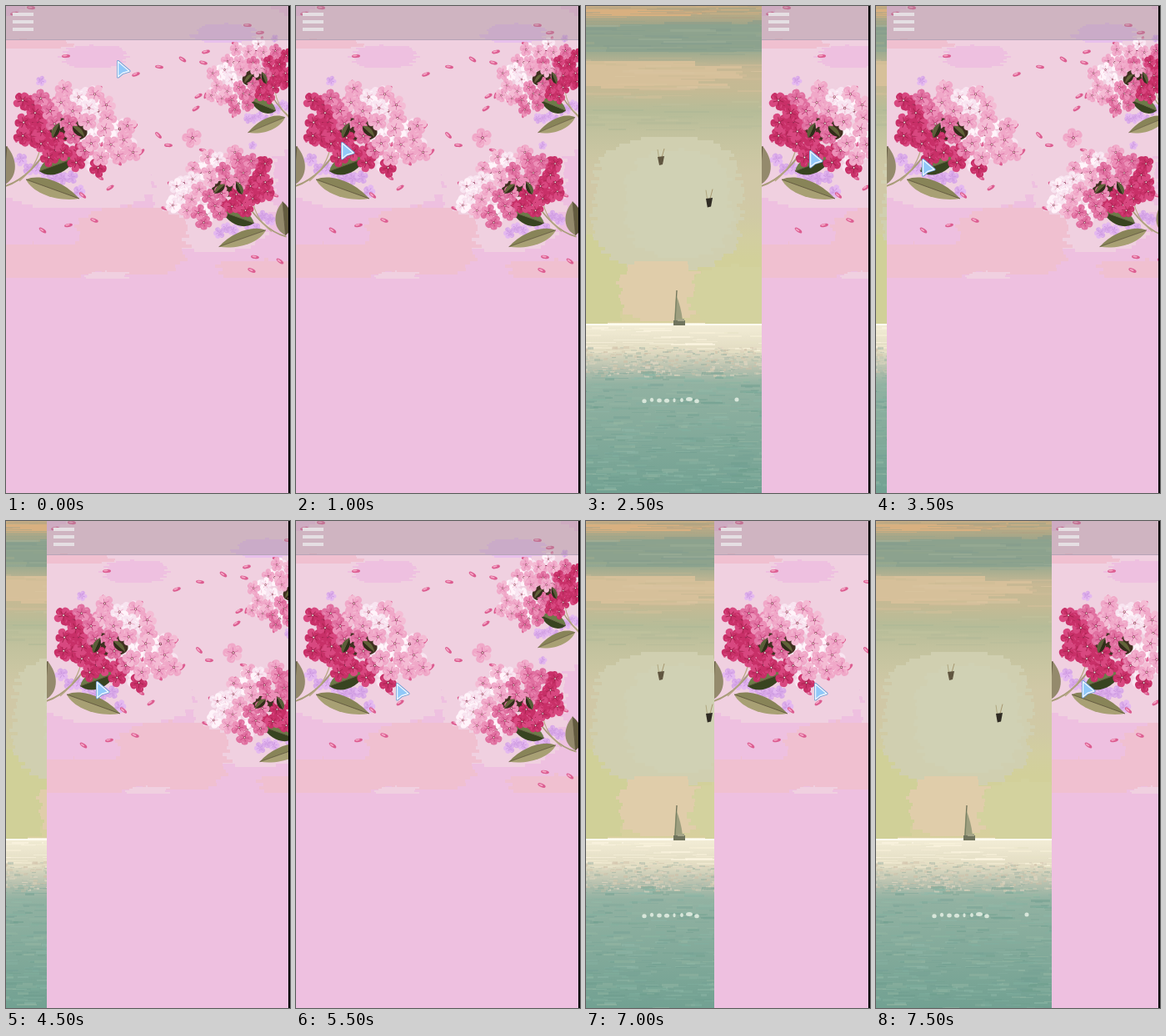
These frames come from a looping animation (341x584 px, 8 s). An HTML page with a canvas:

```html
<!DOCTYPE html>
<html lang="en">
<head>
<meta charset="utf-8">
<title>Sliding drawer</title>
<style>
  html, body { margin: 0; width: 100%; height: 100%; overflow: hidden; background: #000; }
  #stage { position: relative; width: 339px; height: 584px; overflow: hidden; }
  canvas, #panel, #cursor { position: absolute; left: 0; top: 0; }
  #panel { width: 339px; height: 584px; animation: slide 8s step-end infinite; }
  #bar { position: absolute; inset: 0 0 auto; height: 40px; background: rgba(160,140,150,.42); border-bottom: 1px solid #b6a4b8; }
  #bar i { position: absolute; left: 8px; top: 8px; width: 25px; height: 4px; color: #e5dfe3; background: currentColor; box-shadow: 0 9px, 0 18px; }
  #cursor { animation: grab 8s step-end infinite; }
  @keyframes slide {
    0%, 12.5%, 50%, 68.75% { transform: none; }
    18.75% { transform: translateX(168px); }
    25% { transform: translateX(194px); }
    31.25%, 93.75%, 100% { transform: translateX(211px); }
    37.5% { transform: translateX(143px); }
    43.75% { transform: translateX(13px); }
    56.25% { transform: translateX(49px); }
    62.5% { transform: translateX(25px); }
    75% { transform: translateX(102px); }
    81.25% { transform: translateX(118px); }
    87.5% { transform: translateX(154px); }
  }
  /* The pointer rides on the panel; this is where it holds it. */
  @keyframes grab {
    0% { transform: translate(133px, 65px); }
    6.25% { transform: translate(17px, 132px); }
    12.5% { transform: translate(54px, 163px); }
    31.25% { transform: translate(57px, 173px); }
    37.5% { transform: translate(42px, 183px); }
    50% { transform: translate(59px, 192px); }
    68.75% { transform: translate(120px, 194px); }
    93.75%, 100% { transform: translate(36px, 191px); }
  }
</style>
</head>
<body>
<div id="stage">
  <canvas id="sea" width="339" height="584"></canvas>
  <div id="panel">
    <canvas id="garden" width="339" height="584"></canvas>
    <div id="bar"><i></i></div>
    <svg id="cursor" width="20" height="26" stroke-linejoin="round">
      <path id="arrow" d="M1.500 1.500V20L7 15.500L15 13Z" fill="none" stroke="#6898d0" stroke-width="3"/>
      <path d="M1.500 1.500V20L7 15.500L15 13Z" fill="#90c8f8" stroke="#eef6ff" stroke-width="1.500"/>
    </svg>
  </div>
</div>
<script>
let g, seed = 11;
const rnd = (a = 1, b = 0) => {
  seed = (seed * 16807) % 2147483647;
  return b + (a - b) * seed / 2147483647;
};
const pick = list => list[Math.floor(rnd(list.length))];
const times = (n, f) => { for (let i = 0; i < n; i++) f(i); };

function open(id) {
  g = document.getElementById(id).getContext('2d');
}

function box(color, x, y, w, h) {
  g.fillStyle = color;
  g.fillRect(Math.round(x), Math.round(y), Math.ceil(w), Math.ceil(h));
}

function oval(x, y, rx, ry, color, turn = 0) {
  g.beginPath();
  g.ellipse(x, y, rx, ry, turn, 0, 7);
  g.fillStyle = color;
  g.fill();
}

function line(color, width, x, y, ...curve) {
  g.beginPath();
  g.moveTo(x, y);
  if (curve.length > 2) g.quadraticCurveTo(...curve); else g.lineTo(...curve);
  g.strokeStyle = color;
  g.lineWidth = width;
  g.stroke();
}

function shape(color, path) {
  g.fillStyle = color;
  g.fill(new Path2D(path));
}

// Rounded wash of colour with ragged stepped sides.
function patch(color, x, y, rx, ry, step = 4, rag = 6) {
  for (let dy = -ry; dy < ry; dy += step) {
    const half = rx * Math.sqrt(1 - (dy / ry) ** 4);
    const left = half + rnd(rag, -rag), right = half + rnd(rag, -rag);
    box(color, x - left, y + dy, Math.max(0, left + right), step);
  }
}

function streaks(n, y0, y1, w, h, colors, alpha) {
  times(n, () => {
    g.globalAlpha = alpha * rnd(1, .4);
    box(pick(colors), rnd(339, -w), rnd(y1, y0), rnd(w, w / 4), rnd(h));
  });
  g.globalAlpha = 1;
}

function bird(x, y, s, color) {
  line('#b0a880', 1, x - 4, y - 13 * s, x - 2, y);
  line('#a89870', 1, x + 4, y - 14 * s, x, y);
  shape(color, `M${x - 4} ${y - 4}L${x + 4} ${y - 5}L${x + 2} ${y + 5 * s}L${x - 2 * s} ${y + 6 * s}Z`);
}

function drawSea() {
  open('sea');
  const air = g.createLinearGradient(0, 0, 0, 380);
  ['#c8ae84', '#9aa48a', '#95a88e', '#c8b894', '#c4ba94', '#b6bc98', '#c2c29e', '#cac6a2',
   '#d0c8a6', '#d0c8a6', '#d0caa4', '#d2cea0', '#d2d09a', '#d2d09a', '#d4d09c', '#d8d09e'
  ].forEach((c, i, all) => air.addColorStop(i / (all.length - 1), c));
  box(air, 0, 0, 339, 380);
  const water = g.createLinearGradient(0, 380, 0, 584);
  water.addColorStop(0, '#f4eed8');
  water.addColorStop(.16, '#e2dcc2');
  water.addColorStop(.27, '#b6c0ae');
  water.addColorStop(.36, '#92b2a2');
  water.addColorStop(1, '#72a192');
  box(water, 0, 380, 339, 204);

  // Clouds
  patch('#d8b080', 60, 7, 80, 5, 2, 20);
  patch('#8ca28e', 120, 37, 150, 18, 3, 40);
  patch('#d6c09a', 60, 80, 110, 17, 3, 30);
  streaks(50, 0, 14, 80, 2, ['#d8b080', '#b0a080', '#a0a488'], .6);
  streaks(70, 15, 60, 90, 3, ['#809a8c', '#a0b098', '#90a48c'], .5);
  streaks(60, 61, 108, 80, 3, ['#d8c09c', '#c4b890', '#d8c4a0'], .5);
  streaks(45, 106, 150, 70, 3, ['#b0b898', '#c4c4a0', '#a8b494'], .4);

  // Glow behind the birds
  patch('#d0d098', 15, 325, 38, 55);
  patch('#d0cfb0', 98, 235, 88, 82);
  patch('#d0d1b4', 112, 235, 62, 65);
  patch('#e0cdaa', 88, 340, 46, 38);
  patch('#d3d29e', 180, 345, 54, 36);

  // Water
  box('#fffdf0', 0, 381, 339, 2);
  streaks(90, 384, 414, 40, 2, ['#f8f0d8', '#e8e4c8', '#fff8e4'], .7);
  streaks(700, 408, 443, 7, 3, ['#d8d0b8', '#b0bcac', '#e4d8c4', '#a0b4a4', '#d0c0a8'], .65);
  streaks(800, 436, 584, 26, 3, ['#90b8a8', '#74a094', '#80b0a0', '#98b8a4', '#6c9c8c'], .5);
  times(9, i => oval(i < 8 ? 70 + i * 9 : 181, 473 + rnd(2, -2), rnd(4, 1.500), 2.500, '#d8e6da'));

  bird(90, 185, 1, '#605640');
  bird(148, 235, 1.1, '#302c24');

  // Boat
  line('#606850', 1.2, 109, 341, 107, 378);
  shape('rgba(130,140,108,.7)', 'M108 346Q114 360 116 377H106Z');
  box('#70745e', 105, 377, 14, 6);
  box('#a4a488', 110, 375, 8, 3);
}

const tones = {
  deep: ['#c83068', '#d84880', '#a82450'],
  rose: ['#e070a0', '#ec90b8', '#c84880'],
  pale: ['#f0a8c8', '#f4bcd4', '#e080b0'],
  white: ['#f8e4f0', '#fff4fa', '#f0b8d0'],
  lilac: ['#d8a8e8', '#e4b8f0', '#cc98e0']
};

function flower(x, y, r, tone) {
  const [base, light, vein] = tones[tone];
  g.save();
  g.translate(x, y);
  g.rotate(rnd(6));
  times(5, () => {
    g.rotate(Math.PI * .4);
    const s = r * rnd(1.1, .9), w = r * .55;
    shape(pick([base, base, light]), `M0 0C${s * .4} ${-w} ${s} ${-w} ${s} 0C${s} ${w} ${s * .4} ${w} 0 0`);
    line(vein, 1, s * .1, 0, s * .55, s * .1);
    line(light, 1.200, s * .5, -w * .5, s * .8, -w * .2);
  });
  if (tone != 'lilac') {
    oval(0, 0, r * .14, r * .14, '#80284c');
    oval(0, 0, .9, .9, '#fff4e4');
  }
  g.restore();
}

function leaf(x, y, x2, y2, w, dark, light) {
  const d = Math.hypot(x2 - x, y2 - y);
  g.save();
  g.translate(x, y);
  g.rotate(Math.atan2(y2 - y, x2 - x));
  for (const [s, color] of [[w, dark], [-w, light]])
    shape(color, `M0 0C${d * .2} ${s} ${d * .65} ${s} ${d} 0`);
  line('#5c5438', .8, 0, 0, d, 0);
  g.restore();
}

function petal(x, y, turn = rnd(1, -.6), r = 5) {
  oval(x, y, r, r * .42, '#dc5c90', turn);
  oval(x - 1, y - .5, r * .55, r * .2, '#f4a4c4', turn);
}

function drift(n, x, y, dx = 0, dy = 0) {
  times(n, i => petal(x + i * dx, y + i * dy));
}

// Deep blossoms lower left, pale ones upper right.
function toneAt(x, y) {
  const s = (x - 80) / 60 + (145 - y) / 70 + rnd(.2, -.2);
  return s < -.35 ? 'deep' : s < .15 ? 'rose' : s > .4 && rnd() < .35 ? 'white' : 'pale';
}

// Golden-angle spiral in a tilted ellipse, drawn from the rim inwards.
function spiral(n, rx, ry, draw) {
  times(n, i => {
    const a = i * 2.4, d = Math.sqrt(1 - i / n);
    const u = Math.cos(a) * rx * d, v = Math.sin(a) * ry * d;
    draw(83 + u * .93 - v * .36 + rnd(3, -3), 146 + u * .36 + v * .93 + rnd(3, -3));
  });
}

function cluster() {
  times(8, i => flower(18 + i * 10, 190 + i * 3.500 + rnd(8, -8), 8, 'lilac'));
  flower(42, 90, 6, 'lilac');
  line('#a89c78', 2, -4, 217, 30, 208, 58, 158);
  line('#b8a884', 1.3, 16, 210, 38, 192, 42, 166);
  leaf(-3, 215, 1, 168, 16, '#948a6c', '#645c40');
  leaf(40, 198, 84, 182, 14, '#384420', '#6c7c48');
  leaf(24, 208, 88, 231, 13, '#a8a074', '#888458');
  spiral(26, 84, 57, (x, y) => {
    if (x + y > 150) petal(x, y, rnd(6), 5);
  });
  spiral(18, 68, 44, (x, y) => flower(x, y, 13, x > 90 ? 'white' : toneAt(x, y)));
  oval(74, 148, 24, 13, '#403020', .2);
  spiral(34, 74, 48, (x, y) => flower(x, y, 11, toneAt(x, y)));
  leaf(56, 158, 64, 140, 6, '#2c3018', '#586038');
  leaf(80, 144, 94, 157, 6, '#302c18', '#606438');
}

function placeCluster(x, y, sx, sy) {
  g.save();
  g.transform(sx, 0, 0, sy, x, y);
  cluster();
  g.restore();
}

function drawGarden() {
  open('garden');
  const pale = '#f0d0e0', peach = '#f0c0d0', pink = '#eec0e0';
  box(pink, 0, 0, 339, 584);
  patch(pale, 170, 90, 200, 110);
  patch(pale, 85, 190, 95, 52);
  patch(pale, 250, 205, 72, 90);
  patch(peach, 150, 280, 66, 42);
  patch(peach, 35, 304, 80, 22);
  patch(peach, 310, 314, 54, 12);
  patch(peach, 20, 45, 56, 6, 2);
  patch(pink, 105, 60, 38, 14, 2);
  patch('#e8c0ec', 262, 32, 36, 12, 2);
  patch(pale, 121, 322, 24, 5, 2);

  placeCluster(352, -33, -.7, .8);
  placeCluster(333, 90, -.88, .86);
  placeCluster(0, 0, 1, 1);

  flower(224, 158, 12, 'pale');
  drift(4, 240, 55, -28, 9);
  drift(2, 231, 108, -3, 15);
  drift(2, 183, 155, 12, 12);
  drift(3, 44, 269, 31, -6);
  drift(2, 299, 301, 30, 5);
  drift(2, 290, 23, 15, 9);
  drift(2, 10, 9, 20, -7);
  drift(2, 92, 227, 33, -9);
  drift(1, 72, 60);
  drift(1, 237, 68);
  drift(1, 295, 317);
}

drawSea();
drawGarden();
</script>
</body>
</html>
```
